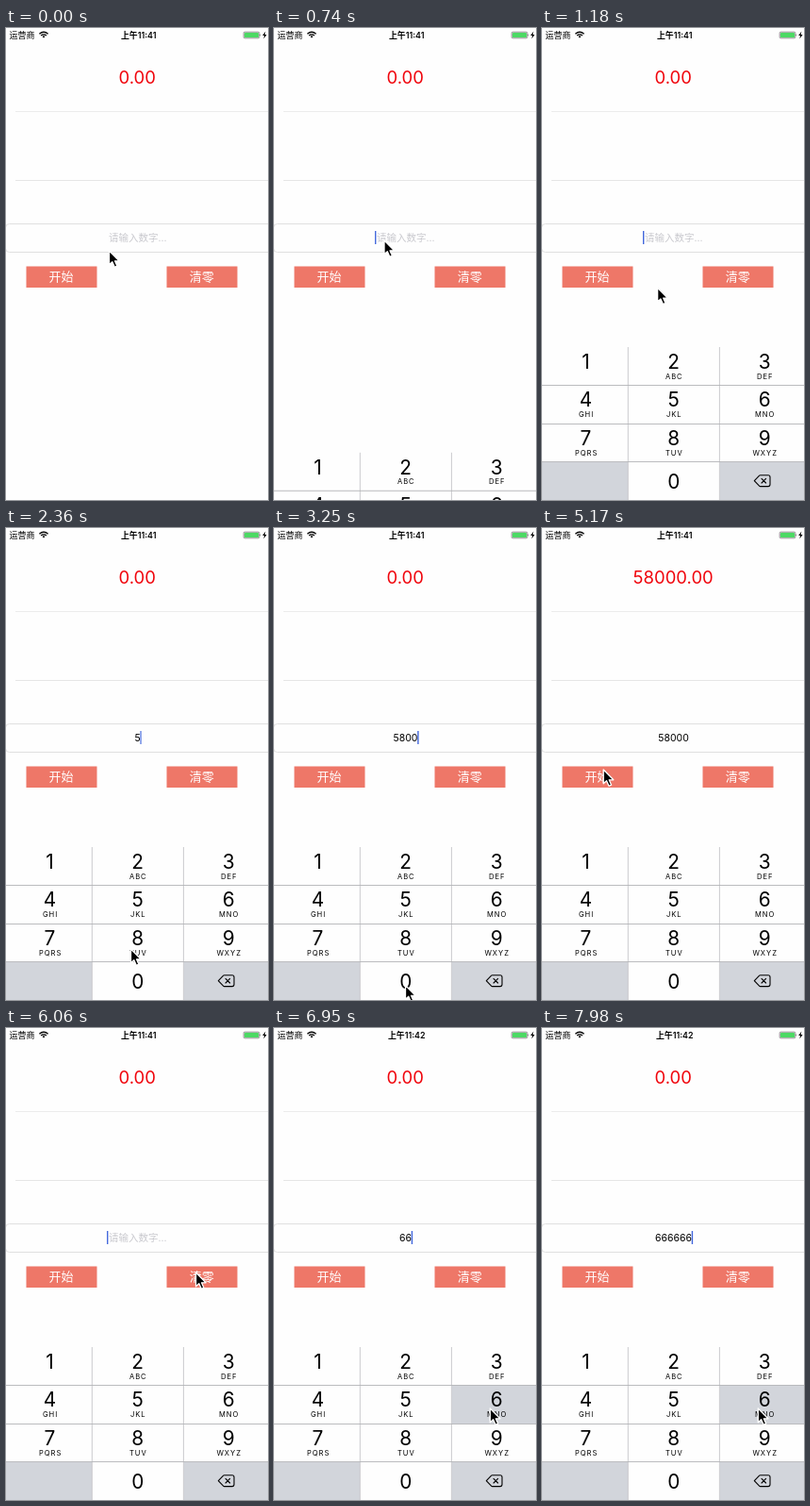
Animation, 278 px wide and 500 px high, one loop 8 s. Source, as an HTML page:

```html
<!DOCTYPE html>
<html lang="zh-CN">
<head>
<meta charset="utf-8">
<title>数字滚动</title>
<style>
html, body { margin: 0; width: 100%; height: 100%; overflow: hidden; background: #fefefe; }
svg { display: block; width: 100vw; height: 100vh; }
text { font-family: Inter, "Noto Sans CJK SC", "Noto Sans CJK", sans-serif; }
.mid { text-anchor: middle; }
.status { font-size: 9px; }
.clock { font-size: 8.9px; font-weight: 600; }
.total { font-size: 18.5px; fill: #f0050c; }
.field { font-size: 10.5px; }
.hint { font-size: 10.5px; fill: #c9c9ce; }
.button { font-size: 13px; fill: #fff; }
.digit { font-size: 20.8px; }
.letters { font-size: 7.6px; letter-spacing: 1px; }
</style>
</head>
<body>
<svg viewBox="0 0 278 500">
  <rect width="278" height="500" fill="#fefefe"/>

  <text class="status" x="3.5" y="10.8">运营商</text>
  <g fill="none" stroke="#000" stroke-width="1.3">
    <path d="M35.4 6.3Q40 2.2 44.6 6.3M37.1 8.1Q40 5.6 42.9 8.1"/>
    <path d="M38.5 8.9Q40 7.8 41.5 8.9L40 10.6Z" fill="#000" stroke="none"/>
  </g>
  <text class="clock mid" id="clock" x="140.7" y="10.8"></text>
  <rect x="252.2" y="4.2" width="16.6" height="6.6" rx="1.3" fill="#fefefe" stroke="#444" stroke-width=".6"/>
  <rect x="253" y="5" width="15" height="5" rx=".6" fill="#4cd964"/>
  <path d="M269.6 6.2q1.1 1.3 0 2.6z"/>
  <path d="M275.4 3.6L272.2 8h2l-.9 3.4L276.6 7h-2z"/>

  <text class="total mid" id="total" x="139.2" y="58.7"></text>
  <path d="M10 88.5H278" stroke="#ececec"/>
  <path d="M10 161.5H278" stroke="#e6e6e6"/>
  <rect x="-.5" y="207.5" width="290" height="30" rx="4" fill="#fefefe" stroke="#e0e0e0"/>
  <text class="hint mid" id="hint" x="139.7" y="226">请输入数字...</text>
  <text class="field mid" id="field" x="139.5" y="226"></text>
  <rect id="caret" y="215" width="1.4" height="14" fill="#4166dc"/>

  <g fill="#ee7768">
    <rect x="21.5" y="252.5" width="75" height="22.5"/>
    <rect x="170.5" y="252.5" width="75" height="22.5"/>
  </g>
  <text class="button mid" x="58.5" y="268.3">开始</text>
  <text class="button mid" x="207.8" y="268.3">清零</text>

  <g id="keyboard">
    <rect y="338" width="278" height="162" fill="#fefefe"/>
    <path d="M0 460H91V500H0ZM189 460H278V500H189Z" fill="#d2d5db"/>
    <rect id="pressed" height="40.6" fill="#d2d5db"/>
    <path d="M91.3 338V500M188.4 338V500" stroke="#c4c5c8" stroke-width=".9"/>
    <path d="M0 378.5H278M0 419.5H278M0 459.5H278" stroke="#b4b5b8" stroke-width=".9"/>
    <g id="keys"></g>
    <g fill="none" stroke="#000" stroke-width="1.1" stroke-linejoin="round" stroke-linecap="round">
      <path d="M225.3 479.7L230.6 474.2Q231 473.8 231.6 473.8H240Q242 473.8 242 475.8V483.6Q242 485.6 240 485.6H231.6Q231 485.6 230.6 485.2Z"/>
      <path d="M233 477.4l4.6 4.6M237.6 477.4l-4.6 4.6"/>
    </g>
  </g>

  <path id="pointer" d="M0 0V14.8L3.3 11.8L5.8 17.3L8.4 16.2L6 10.8H10.6Z" fill="#000" stroke="#fff" stroke-width="1.3" stroke-linejoin="round"/>
</svg>
<script>
// The screen updates in ticks; all times below are counted in them
const LOOP = 8000, TICK = 147.7, LEAD = 11;
const FOCUS = 5, START = 26.9, CLEAR = 41, NEW_MINUTE = 45;
const BLINK = 8, ROW = 40.5;
const $ = id => document.getElementById(id);

// Places the pointer rests at; a key is entered on release
const stops = [
  { x: 109.5, y: 236, arrive: 0, leave: 0 },
  { x: 117, y: 225, arrive: 2, leave: FOCUS },
  { x: 136, y: 394, arrive: 11, leave: 13, key: 5, release: 12.5 },
  { x: 132.5, y: 446, arrive: 16, leave: 17, key: 8, release: 17.5 },
  { x: 139.5, y: 484.5, arrive: 18, leave: 24, key: 0, release: 20, taps: 3 },
  { x: 65.2, y: 256, arrive: 27, leave: 35 },
  { x: 201.5, y: 259, arrive: CLEAR, leave: 42 },
  { x: 229.3, y: 403, arrive: 45, leave: 60, key: 6, release: 45.4, taps: 7, hold: 1.5 }
];
const taps = stops.filter(s => 'key' in s).flatMap(({ key, release, taps = 1, hold = .9 }) =>
  Array.from({ length: taps }, (_, i) => ({ key, hold, time: release + i * 1.5 })));

const clamp = (v, max = 1) => Math.max(0, Math.min(max, v));

function pointerAt(n) {
  const i = stops.findLastIndex(s => s.arrive <= n);
  const from = stops[i], to = stops[i + 1] || from;
  const k = clamp((n - from.leave) / (to.arrive - from.leave)) ** 1.75;
  return [from.x + (to.x - from.x) * k, from.y + (to.y - from.y) * k];
}

function typedAt(n) {
  const since = n < CLEAR ? 0 : CLEAR;
  return taps.filter(t => t.time >= since && t.time <= n).map(t => t.key).join('');
}

function totalAt(n) {
  return n < CLEAR ? 58000 * clamp(Math.round((n - START) * 9), 60) / 60 : 0;
}

function caretAlpha(n) {
  if (n < FOCUS) return 0;
  const moments = [FOCUS, CLEAR, ...taps.map(t => t.time)].filter(m => m <= n);
  const age = n - Math.max(...moments);
  return clamp(.5 + 2 * Math.sin((age + .3) / BLINK * 2 * Math.PI));
}

function set(id, attrs) {
  for (const name in attrs) $(id).setAttribute(name, attrs[name]);
}

function addText(cls, x, y, content) {
  const el = document.createElementNS('http://www.w3.org/2000/svg', 'text');
  el.setAttribute('class', cls + ' mid');
  el.setAttribute('x', x);
  el.setAttribute('y', y);
  el.textContent = content;
  $('keys').append(el);
}

function cell(key) {
  const index = key ? key - 1 : 10;
  return { col: index % 3, row: Math.floor(index / 3) };
}

'0,,ABC,DEF,GHI,JKL,MNO,PQRS,TUV,WXYZ'.split(',').forEach((label, key) => {
  const { col, row } = cell(key);
  const x = 46.5 + col * 94.8 - (col === 1 ? 1.6 : 0);
  addText('digit', x, 360.9 + row * ROW - (key ? 0 : 1.5) * .5 + (key ? 0 : 6) * 1, key);
  if (key) addText('letters', x + .6, 371.6 + row * ROW, label);
});

function showPressed(n) {
  const tap = taps.find(t => n >= t.time - t.hold && n < t.time);
  const { col, row } = cell(tap ? tap.key : 0);
  set('pressed', { x: col * 97 - (col === 2 ? 5 : 5 * col), y: 338 + row * ROW, width: tap ? 97 : 0 });
}

function draw(n) {
  const value = typedAt(n);
  $('clock').textContent = n < NEW_MINUTE ? '上午11:41' : '上午11:42';
  $('total').textContent = totalAt(n).toFixed(2);
  $('field').textContent = value;
  set('hint', { visibility: value ? 'hidden' : 'visible' });
  const width = $('field').getComputedTextLength();
  set('caret', { x: value ? 139.2 + width / 2 : 107, opacity: caretAlpha(n) });
  const drop = 170 * (1 - clamp((n - 4.7) / 2.3)) ** 3;
  set('keyboard', { transform: `translate(0 ${drop})` });
  showPressed(n);
  set('pointer', { transform: `translate(${pointerAt(n)})` });
}

function frame() {
  draw(Math.floor((performance.now() % LOOP + LEAD) / TICK));
  requestAnimationFrame(frame);
}
frame();
</script>
</body>
</html>
```
